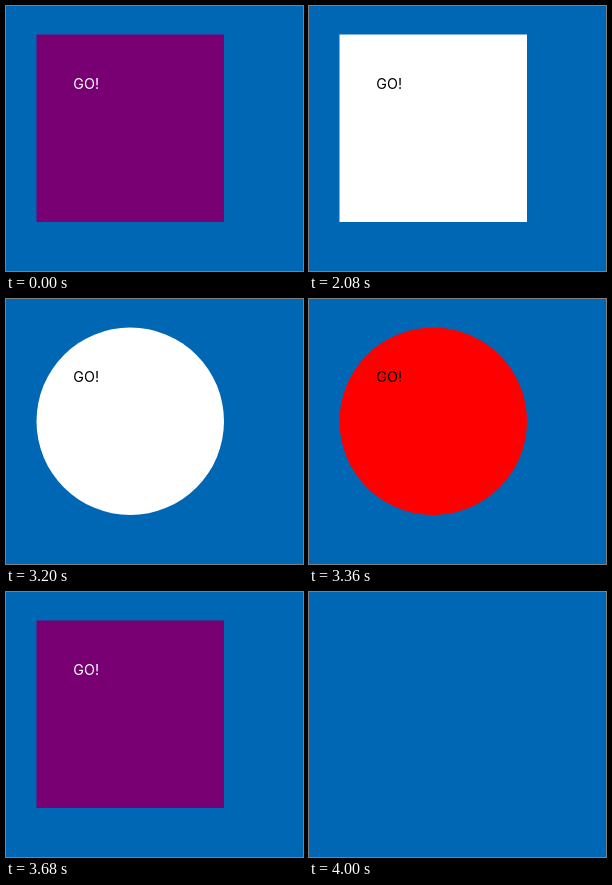
These frames come from a looping animation (297 px wide and 265 px high, 5280 ms). An HTML page with a canvas:

```html
<!DOCTYPE html>
<html lang="en">
<head>
<meta charset="utf-8">
<title>Click Me</title>
<style>
  html, body { margin: 0; width: 100%; height: 100%; overflow: hidden; background: #0067b4; }
  canvas { display: block; }
</style>
</head>
<body>
<canvas id="stage" width="297" height="265"></canvas>
<script>
const ctx = document.getElementById('stage').getContext('2d');
const LOOP = 5280;
const BLUE = '#0067b4', PURPLE = '#780073';
const BOX = { x: 30.5, y: 28.5, size: 187.5 };

// Each state holds until the next one starts.
const states = [
  { at: 0, fill: PURPLE, ink: '#fff', text: 'GO!' },
  { at: 1440, fill: '#fff', ink: '#000', text: 'Click Me' },
  { at: 1760, fill: '#fff', ink: '#000', text: 'GO!' },
  { at: 3040, fill: '#fff', ink: '#000', text: 'GO!', round: true },
  { at: 3360, fill: '#f00', ink: '#000', text: 'GO!', round: true },
  { at: 3680, fill: PURPLE, ink: '#fff', text: 'GO!' },
  { at: 4000, hidden: true }
];

function drawBox({ fill, ink, text, round }) {
  const { x, y, size } = BOX, r = size / 2;
  ctx.fillStyle = fill;
  ctx.beginPath();
  if (round) ctx.arc(x + r, y + r, r, 0, Math.PI * 2);
  else ctx.rect(x, y, size, size);
  ctx.fill();
  ctx.fillStyle = ink;
  ctx.font = '14.3px Inter, Roboto, sans-serif';
  ctx.fillText(text, 67.3, 82.5);
}

function draw(time) {
  const state = states.filter(s => s.at <= time).pop();
  ctx.fillStyle = BLUE;
  ctx.fillRect(0, 0, 297, 265);
  if (!state.hidden) drawBox(state);
}

function tick() {
  draw(performance.now() % LOOP);
  requestAnimationFrame(tick);
}
tick();
</script>
</body>
</html>
```
